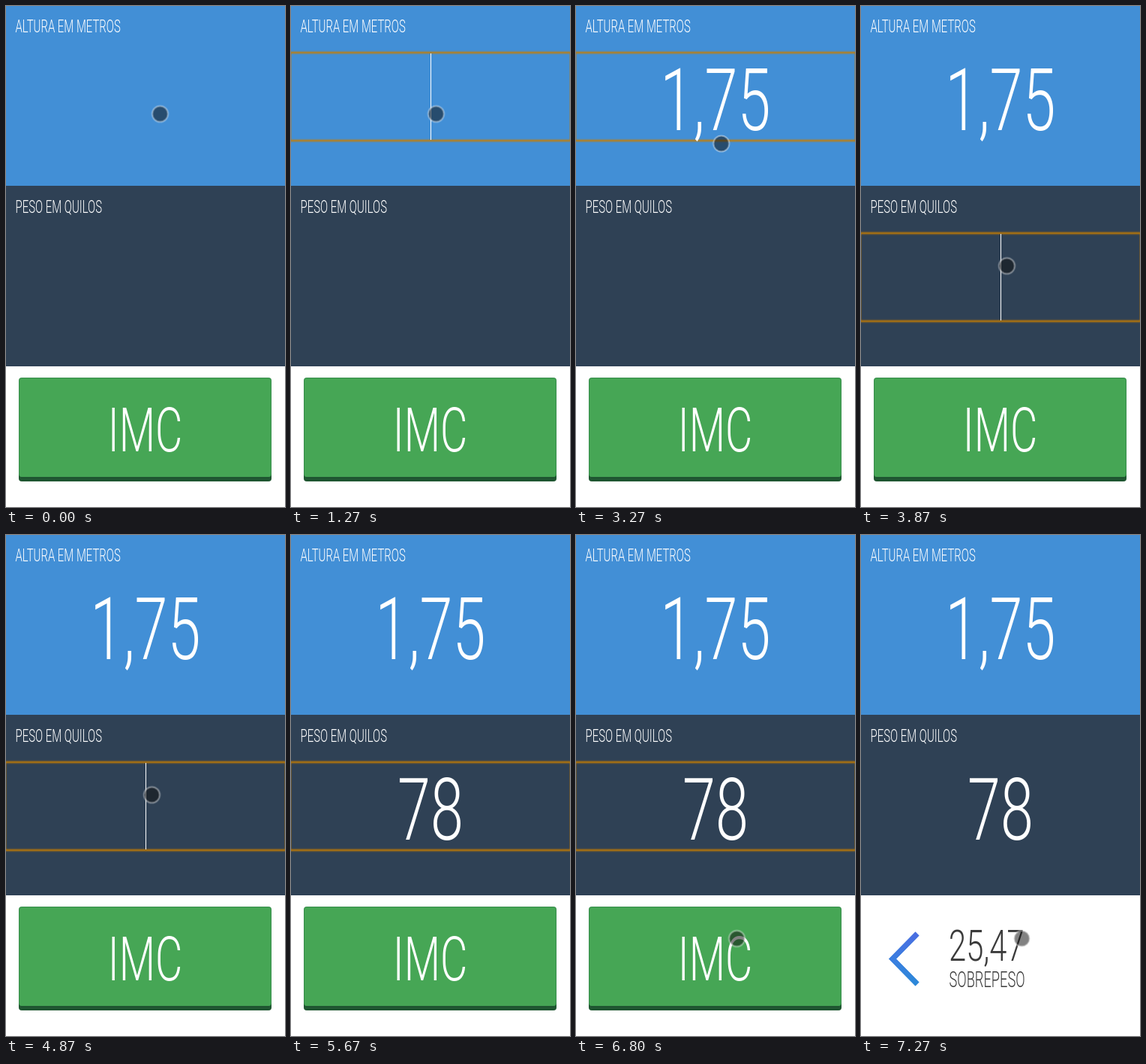
Write an HTML page that moves like this. It is 372x666 px and loops after 8000 ms.

```html
<!DOCTYPE html>
<html lang="pt-BR">
<head>
<meta charset="utf-8">
<title>IMC</title>
<style>
html, body { margin: 0; width: 100%; height: 100%; overflow: hidden; background: #fff; }
svg { display: block; width: 372px; height: 666px; }
text { font-family: Roboto, "Liberation Sans", sans-serif; font-weight: 300; fill: #fff; }
.label { font-size: 23.7px; }
.number { font-size: 115px; text-anchor: middle; }
.title { font-size: 81px; text-anchor: middle; }
.dark text { fill: #3b3b3b; }
.ring { fill: none; stroke: #c87d00; }
.caret { fill: #fff; }
.cursor circle { fill: #0f0f0f; fill-opacity: .52; stroke: #fff; stroke-opacity: .42; stroke-width: 2; }

/* 8 s loop: 1% is 80 ms */
.step { animation: 8s step-end infinite; opacity: 0; }
.height-ring { animation-name: height-ring; }
.weight-ring { animation-name: weight-ring; }
.height-1 { animation-name: height-1; }
.height-2 { animation-name: height-2; }
.height-3 { animation-name: height-3; }
.height-4 { animation-name: height-4; }
.weight-1 { animation-name: weight-1; }
.weight-2 { animation-name: weight-2; }
.height-caret { animation-name: height-caret; }
.weight-caret { animation-name: weight-caret; }
.result { animation-name: result; }
.tint { animation-name: tint; }
.cursor { animation-name: cursor-show; }
.pointer { animation: cursor-move 8s linear infinite; }

@keyframes height-ring { 0%, 48.375% { opacity: 0 } 3.375% { opacity: 1 } }
@keyframes weight-ring { 0%, 89.125% { opacity: 0 } 48.375% { opacity: 1 } }
@keyframes height-1 { 0%, 22.5% { opacity: 0 } 20% { opacity: 1 } }
@keyframes height-2 { 0%, 28.375% { opacity: 0 } 22.5% { opacity: 1 } }
@keyframes height-3 { 0%, 29.125% { opacity: 0 } 28.375% { opacity: 1 } }
@keyframes height-4 { 0% { opacity: 0 } 29.125%, 100% { opacity: 1 } }
@keyframes weight-1 { 0%, 64.125% { opacity: 0 } 63.375% { opacity: 1 } }
@keyframes weight-2 { 0% { opacity: 0 } 64.125%, 100% { opacity: 1 } }
@keyframes result { 0% { opacity: 0 } 89.125%, 100% { opacity: 1 } }
@keyframes tint { 0% { opacity: 0 } 90.875%, 100% { opacity: 1 } }

@keyframes height-caret {
  0%, 9.125% { opacity: 0; transform: translateX(186px) }
  3.375%, 15.875% { opacity: 1; transform: translateX(186px) }
  20% { opacity: 1; transform: translateX(205px) }
  22.5% { opacity: 1; transform: translateX(216px) }
  28.375% { opacity: 1; transform: translateX(237px) }
  29.125%, 42.125% { opacity: 1; transform: translateX(260px) }
  35.875%, 48.375%, 100% { opacity: 0; transform: translateX(260px) }
}
@keyframes weight-caret {
  0%, 55% { opacity: 0; transform: translateX(186px) }
  48.375%, 60.875% { opacity: 1; transform: translateX(186px) }
  63.375% { opacity: 1; transform: translateX(207px) }
  64.125%, 77.125% { opacity: 1; transform: translateX(231px) }
  70.875%, 83.375%, 100% { opacity: 0; transform: translateX(231px) }
}
@keyframes cursor-show {
  0%, 40%, 76.625%, 100% { opacity: 1 }
  20%, 63.375% { opacity: 0 }
}
@keyframes cursor-move {
  0% { transform: translate(205.5px, 143.5px); animation-timing-function: step-end }
  .875% { transform: translate(193.5px, 143.5px) }
  39.5% { transform: translate(193.5px, 143.5px); animation-timing-function: cubic-bezier(.35, .1, .4, 1) }
  45.875% { transform: translate(194.5px, 345.5px) }
  63.375% { transform: translate(194.5px, 345.5px); animation-timing-function: step-end }
  76.5% { transform: translate(200px, 346px); animation-timing-function: cubic-bezier(.35, .1, .4, 1) }
  83.375% { transform: translate(213.5px, 541px); animation-timing-function: ease-out }
  85%, 100% { transform: translate(214.5px, 536.5px) }
}
</style>
</head>
<body>
<svg viewBox="0 0 372 666">
  <defs>
    <linearGradient id="blues" gradientUnits="userSpaceOnUse" x1="0" y1="528" x2="0" y2="599">
      <stop offset="0" stop-color="#4b6ce2"/>
      <stop offset=".55" stop-color="#3a80e0"/>
      <stop offset="1" stop-color="#2a88d8"/>
    </linearGradient>
    <g id="focus">
      <rect x=".5" y="62" width="371" height="117" stroke-width="1" stroke-opacity=".35"/>
      <rect x="-3" y="62" width="378" height="117" stroke-width="5" stroke-opacity=".2"/>
      <rect x="-3" y="62" width="378" height="117" stroke-width="2.6" stroke-opacity=".6"/>
    </g>
    <path id="chevron" d="M75 530 42 563.5 75 597" fill="none" stroke-width="7"/>
  </defs>

  <rect width="372" height="239" fill="#428fd6"/>
  <rect y="239" width="372" height="240" fill="#2f4155"/>
  <text class="label" transform="translate(12.5 34.5) scale(.63 1)">ALTURA EM METROS</text>
  <text class="label" transform="translate(12.5 274.5) scale(.63 1)">PESO EM QUILOS</text>

  <g class="ring step height-ring"><use href="#focus"/></g>
  <g class="ring step weight-ring"><use href="#focus" y="240"/></g>

  <g transform="translate(186 165) scale(.69 1)">
    <text class="number step height-1">1</text>
    <text class="number step height-2">1,</text>
    <text class="number step height-3">1,7</text>
    <text class="number step height-4">1,75</text>
  </g>
  <g transform="translate(186 405) scale(.69 1)">
    <text class="number step weight-1">7</text>
    <text class="number step weight-2">78</text>
  </g>
  <rect class="caret step height-caret" y="63" width="1" height="115"/>
  <rect class="caret step weight-caret" y="303" width="1" height="115"/>

  <rect x="17" y="500" width="337" height="132" rx="4" fill="#1f5631"/>
  <rect x="17" y="494" width="337" height="132" rx="4" fill="#368c4b"/>
  <rect x="18" y="495" width="335" height="131" rx="3" fill="#46a655"/>
  <text class="title" transform="translate(185.5 592) scale(.69 1)">IMC</text>

  <g class="dark step result">
    <rect y="479" width="372" height="187" fill="#fff"/>
    <use href="#chevron" stroke="#428fd6"/>
    <use class="step tint" href="#chevron" stroke="url(#blues)"/>
    <text font-size="58" transform="translate(117 565.5) scale(.72 1)">25,47</text>
    <text font-size="29" transform="translate(117.5 600.5) scale(.63 1)">SOBREPESO</text>
  </g>

  <g class="cursor step"><circle class="pointer" r="10.5"/></g>
</svg>
</body>
</html>
```
